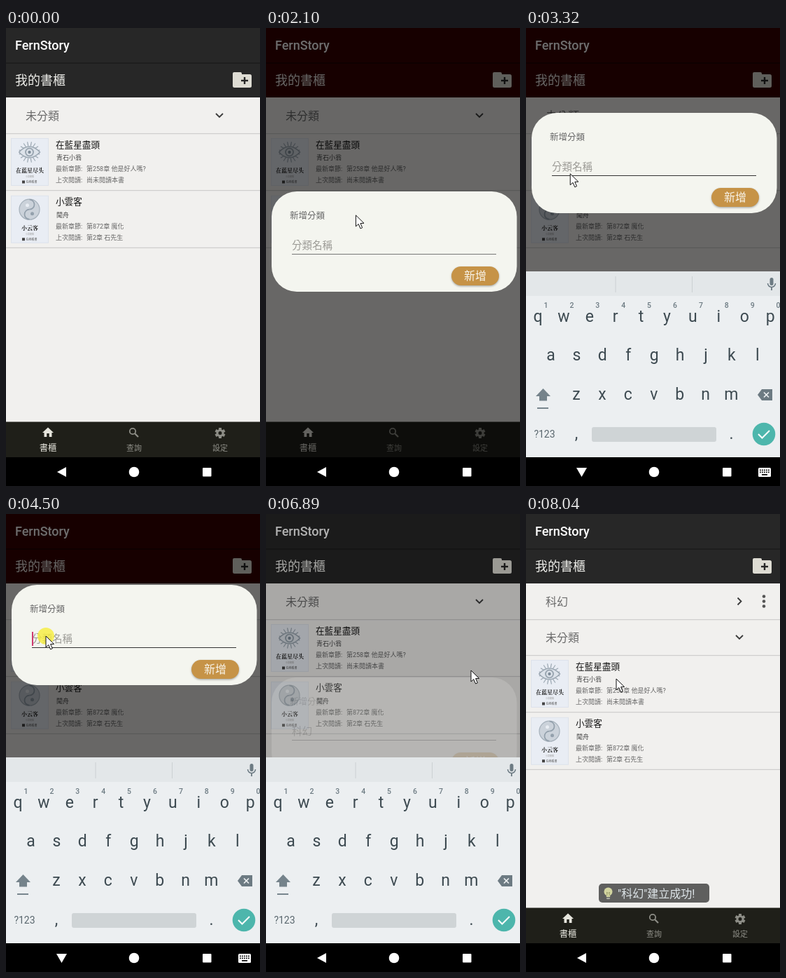
Animation, 363 px wide and 653 px high, one loop 8110 ms. Source, as an HTML page with a canvas:

```html
<!DOCTYPE html>
<html lang="zh-Hant">
<head>
<meta charset="utf-8">
<style>
html, body { margin: 0; width: 100%; height: 100%; overflow: hidden; background: #000; }
canvas { display: block; width: 363px; height: 653px; }
</style>
</head>
<body>
<canvas id="stage"></canvas>
<script>
const W = 363, H = 653, LOOP = 8110;
const SANS = 'Roboto, "Noto Sans CJK TC", "Noto Sans CJK", "Noto Sans CJK JP", sans-serif';
const SERIF = '"Noto Serif CJK SC", "Noto Sans CJK SC", "Noto Sans CJK", serif';
const dpr = window.devicePixelRatio || 1;

function surface(canvas) {
  canvas.width = W * dpr;
  canvas.height = H * dpr;
  const ctx = canvas.getContext('2d');
  ctx.scale(dpr, dpr);
  return ctx;
}
const screen2d = surface(document.getElementById('stage'));
const spare = surface(document.createElement('canvas'));
let c = screen2d;

// Paints a group apart, then lays it over the screen with one opacity
function layer(alpha, dy, paint) {
  if (alpha <= 0) return;
  c = spare;
  c.clearRect(0, 0, W, H);
  c.save();
  c.translate(0, dy);
  paint();
  c.restore();
  c = screen2d;
  c.globalAlpha = alpha;
  c.drawImage(spare.canvas, 0, 0, W, H);
  c.globalAlpha = 1;
}

const ramp = (t, a, b) => Math.min(1, Math.max(0, (t - a) / (b - a)));
const easeOut = u => 1 - (1 - u) ** 2;
const during = (t, a, b) => t >= a && t < b;

const OPEN = 1570, FOCUS = 2800, PASTE = 5550, CLOSE = 6825, LISTED = 7110;
const CLICKS = [1000, 2600, 4500, 5450, 6400];

// Pointer moves: start, end, x, y
const MOVES = [
  [310, 430, 217, 104], [610, 750, 334, 65], [1000, 1040, 338, 72],
  [1565, 1570, 334, 76], [1570, 2500, 82, 310], [2950, 3690, 57, 174],
  [4900, 5400, 62, 137], [5620, 6150, 304, 234], [6300, 6500, 293, 223],
  [7040, 7850, 245, 231], [7920, 8040, 129, 235]
];
function pointerAt(t) {
  let x = 348, y = 318;
  for (const [a, b, toX, toY] of MOVES) {
    const u = easeOut(ramp(t, a, b));
    x += (toX - x) * u;
    y += (toY - y) * u;
  }
  return [x, y];
}

function box(x, y, w, h, color, r = 0) {
  c.fillStyle = color;
  c.beginPath();
  c.roundRect(x, y, w, h, r);
  c.fill();
}
function raisedBox(x, y, w, h, color, r) {
  c.shadowColor = 'rgba(0,0,0,.33)';
  c.shadowBlur = 3 * dpr;
  c.shadowOffsetY = 1.3 * dpr;
  box(x, y, w, h, color, r);
  c.shadowColor = 'transparent';
}
function disc(x, y, r, color) {
  c.fillStyle = color;
  c.beginPath();
  c.arc(x, y, r, 0, 7);
  c.fill();
}
function trace(points) {
  c.beginPath();
  for (let i = 0; i < points.length; i += 2) c.lineTo(points[i], points[i + 1]);
}
function poly(points, color) {
  trace(points);
  c.fillStyle = color;
  c.fill();
}
function pen(color, width) {
  c.strokeStyle = color;
  c.lineWidth = width;
}
function stroke(points, color, width) {
  pen(color, width);
  trace(points);
  c.stroke();
}
function arc(x, y, r, color, width, from = 0, to = 7, back = false) {
  pen(color, width);
  c.beginPath();
  c.arc(x, y, r, from, to, back);
  c.stroke();
}
// Spokes around a centre, as on the gear and the cover
function spokes(x, y, n, from, to, color, width) {
  for (let i = 0; i < n; i++) {
    const a = (i + .5) * 2 * Math.PI / n, dx = Math.cos(a), dy = Math.sin(a);
    stroke([x + from * dx, y + from * dy, x + to * dx, y + to * dy], color, width);
  }
}
// y is the visual middle of the line
function text(s, x, y, size, color, align = 'left', weight = 400, family = SANS) {
  c.font = `${weight} ${size}px ${family}`;
  c.textAlign = align;
  c.fillStyle = color;
  c.fillText(s, x, y + size * .37);
}

function header(red) {
  box(0, 0, W, 99, red ? '#360000' : '#272727');
  box(0, 49, W, 2, red ? '#220000' : '#1e1e1e');
  text('FernStory', 13, 24.5, 18, '#fff', 'left', 500);
  text('我的書櫃', 13, 74, 18, '#eeeeea');
  box(324, 63, 13, 8, '#dedcd3', 2);
  box(324, 66, 27, 19, '#dedcd3', 2.5);
  box(336, 73.8, 10, 2.4, '#272727');
  box(339.8, 70, 2.4, 10, '#272727');
}

function eye(x, y) {
  const ink = '#9ba7b2';
  spokes(x, y, 16, 9, 15, ink, 1.2);
  pen(ink, 1.5);
  c.fillStyle = '#dde3ea';
  c.beginPath();
  c.moveTo(x - 15, y);
  c.quadraticCurveTo(x, y - 16, x + 15, y);
  c.quadraticCurveTo(x, y + 16, x - 15, y);
  c.fill();
  c.stroke();
  arc(x, y, 5.5, ink, 2);
  disc(x, y, 2.2, '#7f8d9a');
}
function swirl(x, y) {
  const ink = '#93a0ac', half = Math.PI / 2;
  disc(x, y, 14.5, '#cbd2da');
  arc(x, y, 14.5, '#a5b0ba', 1.2);
  arc(x, y - 7, 7, ink, 1.7, -half, half);
  arc(x, y + 7, 7, ink, 1.7, -half, half, true);
  disc(x - 3, y - 6, 2.5, '#e9edf3');
  disc(x + 4, y + 6, 2.5, ink);
}

const BOOKS = [
  { art: eye, cover: '在蓝星尽头', title: '在藍星盡頭', author: '青石小翁', latest: '第258章 他是好人嗎?', last: '尚未閱讀本書' },
  { art: swirl, cover: '小云客', title: '小雲客', author: '聞舟', latest: '第872章 魔化', last: '第2章 石先生' }
];

const divider = y => box(0, y, W, 1.3, '#cfcecd');

function book(y, b) {
  box(7, y + 7, 54, 68, '#dde2eb');
  box(8, y + 8, 52, 66, '#e9edf4');
  b.art(33.5, y + 27);
  text(b.cover, 34, y + 53, 8, '#222', 'center', 700, SERIF);
  text('小說連載', 34, y + 62, 3, '#999', 'center');
  box(23, y + 67.5, 4, 4, '#444');
  text('在線看書', 28.5, y + 69.5, 4, '#555');
  text(b.title, 71, y + 16, 12.6, '#151515');
  text(b.author, 72, y + 35, 9, '#444');
  [['最新章節:', b.latest], ['上次閱讀:', b.last]].forEach(([label, value], i) => {
    text(label, 71, y + 51 + i * 16, 9, '#666');
    text(value, 115, y + 51 + i * 16, 9, '#666');
  });
  divider(y + 81);
}

function group(y, name, open) {
  text(name, 28, y + 26, 16, '#6a6a6a');
  c.save();
  c.translate(305, y + 25.5);
  if (!open) c.rotate(-Math.PI / 2);
  stroke([-5, -2.5, 0, 2.5, 5, -2.5], '#3a3a3a', 1.8);
  c.restore();
  if (!open) for (const d of [-7, 0, 7]) disc(340, y + 25.5 + d, 2.3, '#555');
  divider(y + 51);
}

function tabs() {
  const on = '#e6e5dd', off = '#8d8d86', back = '#1f1f19';
  box(0, 561.5, W, 50.5, back);
  poly([60, 569.5, 68, 577, 52, 577], on);
  box(54.5, 576, 11, 7, on);
  box(58.3, 578, 3.4, 5, back);
  arc(181, 575, 4.2, off, 1.8);
  stroke([184, 578, 189, 583], off, 2.2);
  spokes(306, 577.5, 6, 4, 7.5, off, 4);
  arc(306, 577.5, 4, off, 3);
  text('書櫃', 60, 598, 12.3, on, 'center');
  text('查詢', 183, 599, 11, off, 'center');
  text('設定', 306, 599, 11, off, 'center');
}

function systemIcons(typing) {
  poly(typing ? [72, 627, 87, 627, 79.5, 640] : [73, 633, 86, 626, 86, 640], '#fff');
  disc(183, 633, 7.3, '#fff');
  box(281, 627, 12.5, 12.5, '#fff', 1);
  if (!typing) return;
  box(332, 627, 18, 13, '#fff', 1.5);
  for (let i = 0; i < 10; i++) box(334 + i % 5 * 3, i < 5 ? 629.5 : 632.5, 1.7, 1.7, '#000');
  box(337, 636, 8, 1.7, '#000');
}

function dialog(t) {
  const pasted = t >= PASTE, focused = t >= FOCUS;
  box(8, 0, 350.5, 143, '#f4f5ef', 36);
  text('新增分類', 34, 34.5, 12.5, '#666');
  text(pasted ? '科幻' : '分類名稱', 37, 77, 14.5, pasted ? '#5a5a5a' : '#9b9a95');
  box(37, 89, 292, 1, focused ? '#333' : '#777');
  const blink = Math.floor(pasted ? (t - PASTE) / 500 + 1 : t / 500) % 2;
  if (focused && blink && t < CLOSE) box(pasted ? 65 : 37, 67, 2, 20, '#d03a70');
  raisedBox(265, 107, 68, 27, '#c69347', 13.5);
  text('新增', 299, 120.5, 16, '#f8f4ea', 'center');
}

function pasteMenu() {
  raisedBox(25, 131, 73, 35, '#fafafa', 2);
  text('貼上', 61.5, 148.5, 12.5, '#333', 'center', 500);
  poly([38, 190, 45, 197, 31, 197], '#d03a70');
  disc(38, 202, 9, '#d03a70');
}

function keyboard() {
  const ink = '#3d4a51', gray = '#6c7a82', back = '#eceff1', gap = 36.9;
  box(0, 347, W, 265, back);
  box(0, 347, W, 35, '#e3e7e9');
  for (const x of [127.5, 237]) box(x, 354, 1, 23, '#cbd0d3');
  box(348.5, 356, 5, 11, gray, 2.5);
  arc(351, 364, 5.5, gray, 1.5, 0, Math.PI);
  stroke([351, 369, 351, 374], gray, 1.8);

  [['qwertyuiop', 17], ['asdfghjkl', 35.5], ['zxcvbnm', 72]].forEach(([keys, x], r) =>
    [...keys].forEach((k, i) => text(k, x + i * gap, 410 + r * 55.7, 23, ink, 'center')));
  [...'1234567890'].forEach((k, i) => text(k, 28.5 + i * gap, 395, 10.5, gray, 'center', 500));

  poly([24.5, 514, 35, 525, 14, 525], '#75838b');
  box(19, 524, 11, 7.5, '#75838b');
  box(16, 541, 16, 2, '#78868e');
  poly([331, 523, 337, 515, 352, 515, 352, 531, 337, 531], gray);
  for (const d of [-3.5, 3.5]) stroke([343.5 - d, 519.5, 343.5 + d, 526.5], back, 1.7);

  text('?123', 26.5, 578.5, 14, '#59666d', 'center');
  text(',', 72, 577.5, 23, ink, 'center');
  text('.', 293.5, 577.5, 23, ink, 'center');
  box(94, 569, 178, 21, '#cfd4d6', 3);
  disc(340, 579, 16.3, '#4db6ac');
  stroke([332, 579, 337.5, 584.5, 348, 574], '#fff', 2);
}

function toast() {
  box(104, 527, 158, 27, '#5f5f5e', 5);
  disc(117.5, 538.5, 6, '#d3d5a0');
  box(114.8, 543, 5.4, 3, '#d3d5a0');
  box(115, 547, 5, 2.2, '#a9aaa0', 1);
  stroke([116, 544, 115.5, 539, 117.5, 541, 119.5, 539, 119, 544], '#8f9060', .8);
  text('"科幻"建立成功!', 131, 541, 16, '#dfe6ea');
}

function pointer(x, y, pressed) {
  if (pressed) disc(x, y, 12, 'rgba(246,238,60,.8)');
  c.save();
  c.translate(x, y);
  const shape = [0, 0, 0, 16, 3.8, 12.6, 6.6, 19, 9.3, 17.8, 6.6, 11.6, 11.6, 11.4, 0, 0];
  poly(shape, '#fff');
  stroke(shape, '#111', 1);
  c.restore();
}

function draw(t) {
  const opened = t >= OPEN;
  const dim = opened ? .57 * (ramp(t, 1525, 1755) - ramp(t, CLOSE, 6965)) : 0;
  const shown = opened ? ramp(t, 1525, 1575) - ramp(t, CLOSE, 6905) : 0;

  box(0, 0, W, H, '#000');
  box(0, 99, W, 463, '#f1f0ee');
  let y = 99;
  if (t >= LISTED) {
    group(y, '科幻', false);
    y += 51;
  }
  group(y, '未分類', true);
  BOOKS.forEach((b, i) => book(y + 51 + i * 81.7, b));
  tabs();
  header(dim > .5);
  box(0, 0, W, 612, `rgba(0,0,0,${dim})`);

  const lift = easeOut(ramp(t, 2940, 3560)) - easeOut(ramp(t, 6560, CLOSE));
  layer(shown, Math.round(233 - 132 * lift), () => dialog(t));
  layer(ramp(t, 5000, 5200) - ramp(t, PASTE, PASTE + 130), 0, pasteMenu);

  const up = ramp(t, 2970, 3180) - ramp(t, 7040, 7230);
  layer(Math.sqrt(up), Math.round(32 * (1 - up * up)), keyboard);
  systemIcons(during(t, 2970, 6860));

  layer(ramp(t, 7350, 7600), 0, toast);
  if (t >= 310) pointer(...pointerAt(t), CLICKS.some(k => during(t, k, k + 210)));
}

function tick() {
  draw(performance.now() % LOOP);
  requestAnimationFrame(tick);
}
tick();
</script>
</body>
</html>
```
